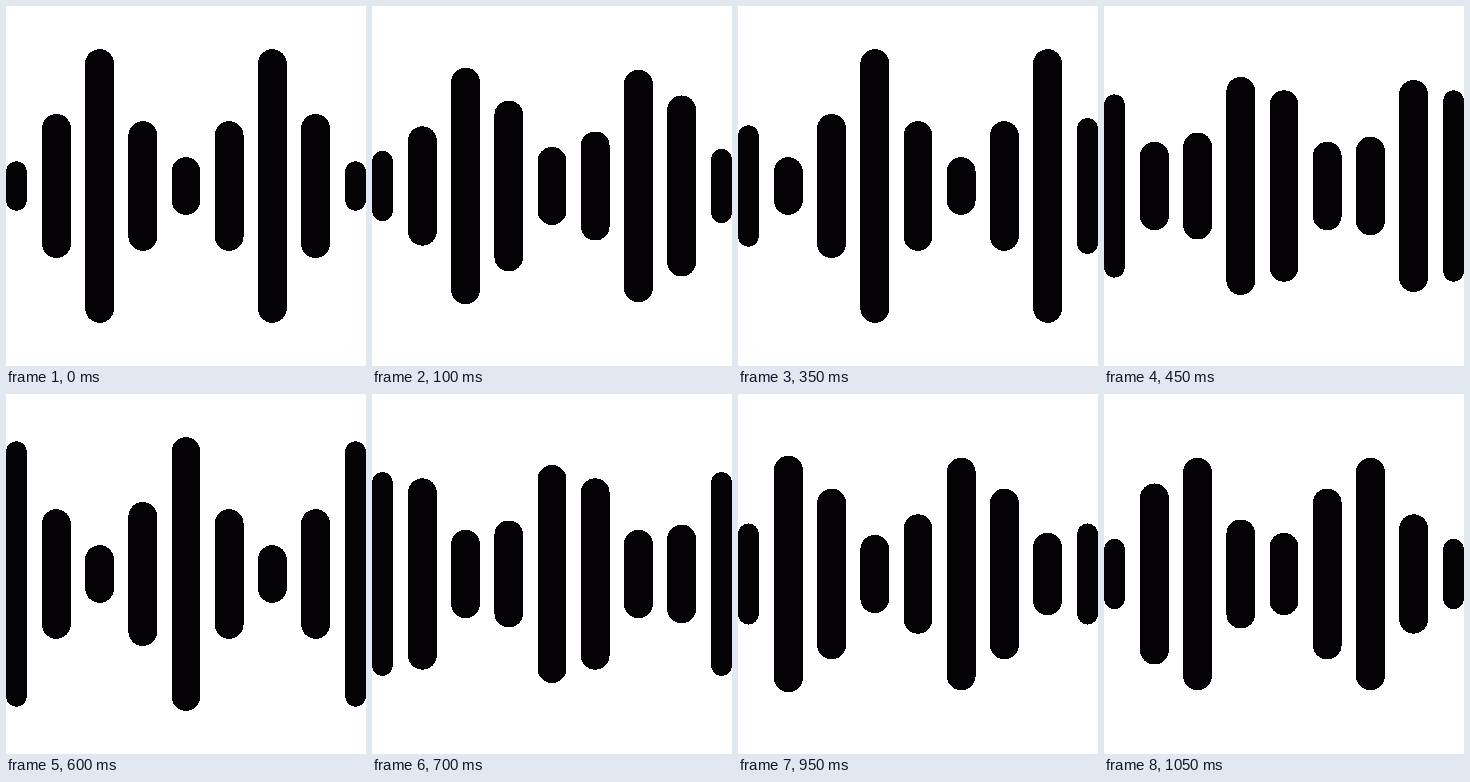
Write an HTML page that moves like this. It is 360 by 360 pixels and loops after 1100 ms.

```html
<!DOCTYPE html>
<html lang="en">
<head>
<meta charset="utf-8">
<title>Sound bars</title>
<style>
  html, body { margin: 0; width: 100%; height: 100%; overflow: hidden; background: #fff; }
  svg { display: block; width: 100%; height: 100%; }
  line { stroke: #040204; stroke-width: 4; stroke-linecap: round; shape-rendering: crispEdges; }
  .edge { stroke-width: 2.9; }
</style>
</head>
<body>
<svg id="stage" viewBox="0 0 50 50"></svg>
<script>
  const STEP = 50, STEPS = 22, SEGMENT = 7, LAST = 8;

  const stage = document.getElementById("stage");
  const bars = Array.from({ length: LAST + 1 }, (_, i) => {
    const bar = document.createElementNS("http://www.w3.org/2000/svg", "line");
    if (i % LAST === 0) bar.setAttribute("class", "edge");
    const x = Math.min(Math.max(1 + 6 * i, 1.45), 48.55);
    bar.setAttribute("x1", x);
    bar.setAttribute("x2", x);
    return stage.appendChild(bar);
  });

  // A wave four bars long moves one bar to the right per pose.
  function halfLength(i, pose) {
    const j = i - pose % 4;
    const rise = Math.abs((j + 6) % 4 - 2); // 0 in a trough, 2 on a crest
    const bump = j % 6 === 1 ? 1 : 0;
    return 2 + 2.5 * rise * (rise + 1) + bump;
  }

  // Moves one unit per step at first, then skips every fourth unit.
  const progress = n => Math.max(n, 1 + Math.floor((n - 2) * 4 / 3));

  function draw(time) {
    const pos = progress(Math.floor(time / STEP) % STEPS) / SEGMENT;
    const pose = Math.floor(pos);
    bars.forEach((bar, i) => {
      const from = halfLength(i, pose), to = halfLength(i, pose + 1);
      const half = from + (to - from) * (pos - pose);
      bar.setAttribute("y1", 25 - half);
      bar.setAttribute("y2", 25 + half);
    });
  }

  let start;
  function tick(now) {
    start ??= now;
    draw(now - start);
    requestAnimationFrame(tick);
  }
  draw(0);
  requestAnimationFrame(tick);
</script>
</body>
</html>
```
